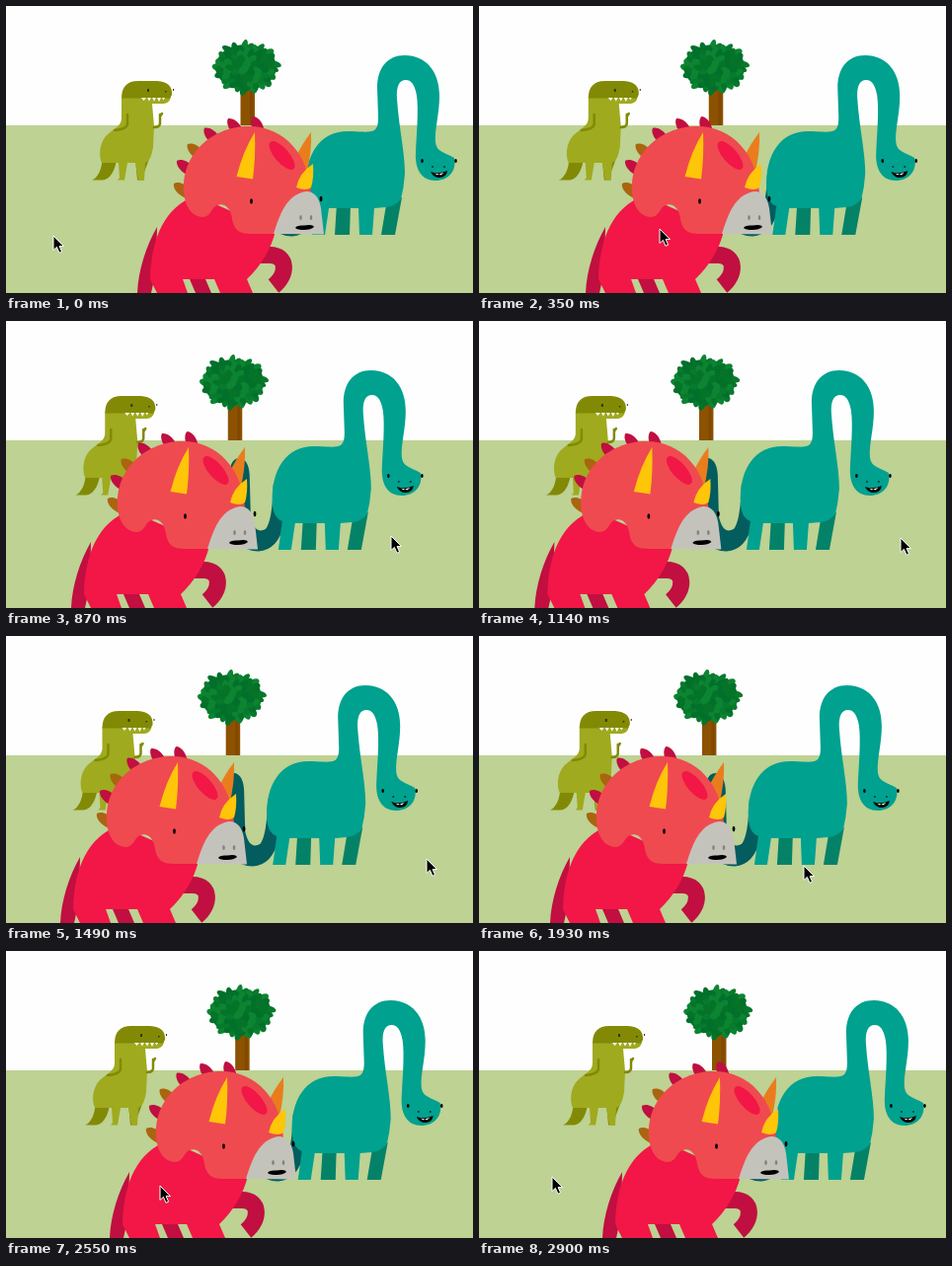
Animation, 473 px wide and 291 px high, one loop 2.98 s. Source, as an HTML page:

```html
<!DOCTYPE html>
<html lang="en">
<head>
<meta charset="utf-8">
<title>Dinosaur parallax</title>
<style>
html, body { margin: 0; width: 100%; height: 100%; overflow: hidden; background: #fefefe; }
svg { display: block; width: 100%; height: 100%; }
.olive { fill: #9faa1e; } .moss { fill: #828a05; }
.teal { fill: #00a18f; } .sea { fill: #048268; } .deep { fill: #035c5e; }
.red { fill: #f21746; } .coral { fill: #ef4a50; } .wine { fill: #c00f40; }
.rust { fill: #a9650f; } .yellow { fill: #fec509; }
</style>
</head>
<body>
<svg viewBox="0 0 473 291">
  <path fill="#fefefe" d="M0,0H473V291H0z"/>
  <g id="tree">
    <path fill="#8d5200" d="M237.500,84H252V123H237.500z"/>
    <path fill="#824800" d="M247,84h3v37h-3z"/>
    <g id="crown"></g>
  </g>
  <path fill="#bdd293" d="M0,121H473V291H0z"/>

  <g id="rex">
    <path class="moss" d="M97,148C99,162 94,174 87,176.500H98C105,176 110,168 112,156zM131,155H145L138,174L140,176.500H133z"/>
    <path class="olive" d="M117,92V114C117,122 108,125 102,131C94,139 94,153 97,159H114L115,174L113,176.500H120L123,159H131L134,176.500H140L141,159Q147,157 149,143L150,122L148,99H160Q166,98 167,92z"/>
    <path class="moss" d="M117,93.500Q117,76 134,76H153Q169,77 168,90L166,93.500z"/>
    <path fill="#fff" d="M137,93h5l-2.500,3zM143,93h4l-2,3.500zM148,93h4l-2,3.500zM153,93h4l-2,4zM158,93h3l-1.500,2.500z"/>
    <path fill="none" stroke="#828a05" stroke-width="2.500" stroke-linecap="round" d="M123,110V120Q122,125 110,126M150,123Q157,123 156,117V110M156,112L158,109"/>
    <path fill="#343800" d="M143,84h2v3h-2zM161,86h1.500v1.500h-1.500zM169,84h1v2h-1z"/>
  </g>

  <g id="sauropod">
    <path class="deep" d="M262,146Q265,138 272,139Q281,142 281,160L282,198Q286,217 297,211Q304,203 305,165L316,205Q310,232 290,233.500Q265,234 263,200z"/>
    <path class="sea" d="M335,200H349L348,232H333zM385,202L401,194L394,232H380z"/>
    <path class="teal" d="M304,186C302,148 320,125 350,127C371,128 377,130 377,113L376,83C376,63 386,50 404,50C425,50 439,66 439,91C439,110 434,125 435,138C436,148 444,148 454,154C457,168 447,177 435,177C421,177 414,166 415,148C416,128 418,105 416,91C414,79 410,75 405,75C398,75 395,82 396,94C398,124 404,148 404,170Q403,184 400,196Q394,203 385,204L373,205L371,232H358L357,205H327L323,232H310L314,203Q305,200 304,186z"/>
    <path d="M430,168Q438,171 447,167Q446,174 439,174Q433,174 430,168z"/>
    <path fill="#fff" d="M434,169.500l3,2 1.500,-1.500 2,1.500 3,-2.500q-5,2-9.500,.5z"/>
    <g fill="#06373a">
      <circle cx="432" cy="163" r="1"/><circle cx="444" cy="163" r="1"/>
    </g>
    <ellipse cx="421.500" cy="157" rx="1.300" ry="2"/><ellipse cx="455.500" cy="157" rx="1.300" ry="2"/>
  </g>

  <g id="triceratops">
    <path class="wine" d="M153,224C142,243 134,268 133,291H147L152,268zM183,270H199L208,291H192z"/>
    <path fill="none" stroke="#c00f40" stroke-width="17" d="M250,252.500H267C286,252.500 285,273 271,284"/>
    <path class="red" d="M192,192C161,204 147,235 146,277L153,291H184L179,277H211L217,291H250L244,277Q266,256 273,228z"/>
    <g id="spikes"></g>
    <path fill="#e97d1d" d="M309,128Q310,148 304,172L291,158Q299,141 309,128z"/>
    <path class="coral" d="M181,195C174,154 206,122 246,122C282,122 307,151 309,190L300,231H248C236,231 231,227 229,216C228,205 221,199 214,202C208,204 208,213 200,214C190,214 183,206 181,195z"/>
    <path fill="#c4c3bb" d="M271,231C277,212 284,191 304,188Q316,188 319,205L322,231.500z"/>
    <ellipse class="red" cx="279.500" cy="151.500" rx="18" ry="7.200" transform="rotate(49 279.500 151.500)"/>
    <path class="yellow" d="M252,128Q253,153 250,175.500L233.500,173Q240,147 252,128z"/>
    <path class="yellow" d="M311,160Q312,174 309,184Q304,188 294,184Q297,169 311,160z"/>
    <ellipse cx="248.500" cy="198" rx="1.400" ry="2.800"/><ellipse cx="319" cy="195.500" rx="1.400" ry="2.800"/>
    <g fill="#83827d">
      <ellipse cx="298.500" cy="214.500" rx="1.300" ry="2.500"/><ellipse cx="309" cy="214.500" rx="1.300" ry="2.500"/>
    </g>
    <path d="M293,225Q294,222 302,222.500Q311,221 312,224Q309,227 302,227Q295,227 293,225z"/>
  </g>

  <path id="cursor" stroke="#fff" stroke-width="1" d="M0,0V14.500L3.400,11.400L6,17.300L8.600,16.200L6.100,10.600H10.500z"/>
</svg>
<script>
const get = id => document.getElementById(id);
const LOOP = 2980;

// Tree crown: leaf clumps pointing outwards, the outermost ones drawn first.
let seed = 7;
const random = () => (seed = seed * 16807 % 2147483647) / 2147483647;
const greens = ['#00702b', '#087a2d', '#0c8432', '#057429'];
const LEAVES = 75;
let leaves = '<ellipse cx="243" cy="62" rx="31" ry="23" fill="#05702a"/>';
for (let i = LEAVES; i > 0; i--) {
  const angle = i * 2.4, reach = Math.sqrt(i / LEAVES);
  const x = 243.5 + 30 * reach * Math.cos(angle), y = 62.5 + 22.5 * reach * Math.sin(angle);
  const turn = angle * 180 / Math.PI + 50 * (random() - .5);
  leaves += `<ellipse cx="${x}" cy="${y}" rx="${5 + 2.5 * random()}" ry="${3 + random()}"
    transform="rotate(${turn} ${x} ${y})" fill="${greens[Math.floor(random() * greens.length)]}"/>`;
}
get('crown').innerHTML = leaves;

// Frill spikes: base x, base y, rotation, colour.
get('spikes').innerHTML = [
  [256, 126, -22, 'wine'], [234, 126, -37, 'wine'], [211, 135, -42, 'wine'],
  [195, 150, -48, 'rust'], [185, 166, -52, 'wine'], [182, 189, -53, 'rust']
].map(([x, y, turn, color]) =>
  `<path class="${color}" transform="translate(${x} ${y}) rotate(${turn})" d="M-5,3C-7,-8 -3,-14 0,-15C4,-13 7,-7 5,3z"/>`
).join('');

// Frames last 90 ms, apart from a few 80 ms ones.
const shortSteps = [3, 6, 9, 16, 19, 23, 30, 33];
const steps = [0];
for (let i = 0; i < 33; i++) steps.push(steps[i] + (shortSteps.includes(i) ? 80 : 90));

// time, cursor x, cursor y, parallax shift of the nearest layer
const track = [
  [0, 48, 233, 0], [350, 183, 226, 25], [870, 390, 218, 67], [1270, 433, 222, 79],
  [1490, 426, 226, 78], [1930, 329, 233, 61], [2550, 156, 238, 28], [2900, 74, 229, 8]
];
const keyAt = i => {
  const n = track.length, lap = Math.floor(i / n), [time, ...values] = track[i - lap * n];
  return [time + lap * LOOP, ...values];
};

// Smooth periodic curve through the track.
function sample(time, column) {
  let i = track.length - 1;
  while (track[i][0] > time) i--;
  const [a, b, c, d] = [-1, 0, 1, 2].map(k => keyAt(i + k));
  const span = c[0] - b[0], u = (time - b[0]) / span;
  const slope = (p, q) => (q[column] - p[column]) / (q[0] - p[0]) * span;
  const start = slope(a, c), end = slope(b, d), rise = c[column] - b[column];
  return b[column] + u * (start + u * (3 * rise - 2 * start - end + u * (start + end - 2 * rise)));
}

const depths = { tree: .19, rex: .25, sauropod: .51, triceratops: 1 };
const move = (id, x, y = 0) => get(id).setAttribute('transform', `translate(${x} ${y})`);

function draw(now) {
  const elapsed = now % LOOP;
  const time = steps.filter(start => start <= elapsed).pop();
  const shift = sample(time, 3);
  for (const id in depths) move(id, -shift * depths[id]);
  move('cursor', Math.round(sample(time, 1)), Math.round(sample(time, 2)));
}
function tick() {
  draw(performance.now());
  requestAnimationFrame(tick);
}
tick();
</script>
</body>
</html>
```
